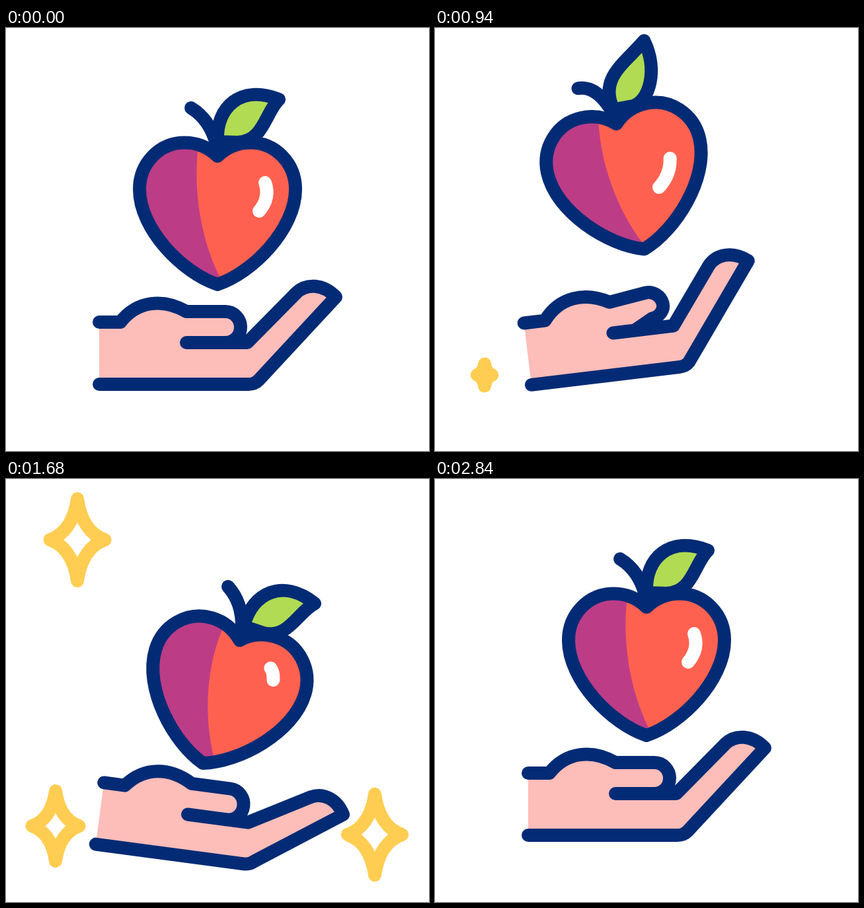
An HTML page with a canvas that plays this animation: 640x640 px, repeating every 3140 ms.

```html
<!DOCTYPE html>
<html lang="en">
<head>
<meta charset="utf-8">
<title>Apple and hand</title>
<style>
  html, body { margin: 0; height: 100%; overflow: hidden; background: #fff; }
  canvas { display: block; }
</style>
</head>
<body>
<canvas width="640" height="640"></canvas>
<script>
const ctx = document.querySelector('canvas').getContext('2d');
const LOOP = 3140;
const NAVY = '#032b75', CORAL = '#ff6150', PURPLE = '#bd3c86', GREEN = '#b1db52',
      PINK = '#fdbdb9', YELLOW = '#ffcd51';

function ease(t, from, to) {
  const x = Math.min(1, Math.max(0, (t - from) / (to - from)));
  return x * x * (3 - 2 * x);
}

// Rises from 0 to 1 at the peak and falls back
const bump = (t, start, peak, end) => ease(t, start, peak) - ease(t, peak, end);

function paint(path, fill, stroke, width = 20) {
  if (fill) { ctx.fillStyle = fill; ctx.fill(path); }
  if (stroke) { ctx.strokeStyle = stroke; ctx.lineWidth = width; ctx.stroke(path); }
}

function turned(x, y, degrees, draw) {
  ctx.save();
  ctx.translate(x, y);
  ctx.rotate(degrees * Math.PI / 180);
  draw();
  ctx.restore();
}

// Points relative to a joint, turned and scaled about it
function swing(x, y, degrees, scale, points) {
  const a = degrees * Math.PI / 180, c = scale * Math.cos(a), s = scale * Math.sin(a);
  return points.map(([px, py]) => [x + px * c - py * s, y + px * s + py * c]);
}

function drawHand(t) {
  const bend = 1.05 * (bump(t, 480, 1200, 1740) - bump(t, 1200, 1740, 2840));
  const drop = 14 * (ease(t, 860, 1320) - ease(t, 1680, 2200));
  const up = Math.max(0, bend);
  const thumb = swing(132, -63, -10.5 * up, 1 - 0.07 * up,
    [[59, 0], [72, 0], [82, 11], [82, 23.5], [82, 37 - 4 * up], [72, 47 - 6 * up], [59, 47 - 6 * up]]);
  const finger = swing(229, 0, 3.3 * bend ** 2 - 11.5 * bend, 1 + 0.035 * (bend - bend ** 2),
    [[70, -92], [84, -105], [109, -106], [129, -85]]);
  const hand = new Path2D(`M0-47H32C58-80 97-83 132-63
    L${thumb[0]}C${thumb.slice(1)}L165-16H132H224
    L${finger[0]}C${finger.slice(1)}L241 41Q235 47 226 47H0`);
  turned(141 - bend, 492 + drop, -8.6 * bend - 0.9 * bend ** 2,
    () => paint(hand, PINK, NAVY));
}

const heart = new Path2D(`M0 0C-14-14-31-20.5-50-20.5C-88-20.5-118 11-118 50
  C-118 111-52 177 0 194C52 177 118 111 118 50C118 11 88-20.5 50-20.5C31-20.5 14-14 0 0Z`);

function drawApple(t) {
  const lift = bump(t, 320, 1050, 1680);
  const press = bump(t, 1050, 1680, 2150);
  const rebound = bump(t, 1680, 2150, 2840);
  const height = 57 * lift - 42 * bump(t, 1050, 1680, 2060) + 14 * bump(t, 1680, 2060, 2320);
  const flex = 1.05 * lift + 1.2 * rebound;
  const light = 1.05 * bump(t, 320, 1100, 1680) - bump(t, 1100, 1680, 2150);
  const shade = 11 * press - 5 * lift - 12 * rebound;

  const leaf = new Path2D(`M0-2C${-2 - 8 * flex}-52 ${35 - 3 * flex} ${23 * flex - 87}
    ${93 - 25 * flex} ${-64 - 28 * flex}C${72 + 8 * flex}-44 ${70 - 14 * flex} 0 30 1L0 0Z`);
  const stem = new Path2D(`M${-40 - 5 * flex} ${8 * flex - 73}
    Q${-12 - 5 * flex} ${-56 - 8 * flex} -2-19`);
  const shadow = new Path2D(`M${4 * flex - 29}-21L${4 * flex - 30}-7
    C-36 56 ${shade / 2 - 25} 126 ${shade + 4} 184V200H-130V-21Z`);
  const along = (base, slide, curve) => base + slide * light + curve * light ** 2;
  const shine = new Path2D(`M${along(72, 5, -10)} ${along(40, 22, 9)}
    Q${along(80, -1, -18)} ${along(63, 32, 0)} ${along(63, -13, -10)} ${along(83, 33, -7)}`);

  turned(320 - 3.5 * lift - 22 * press + 8 * rebound, 388 - height,
    16.6 * press - 13.4 * lift - 4.6 * rebound, () => {
      ctx.translate(0, -194);
      turned(0, -22, -12 * rebound, () => paint(leaf, GREEN, NAVY));
      paint(stem, null, NAVY);
      paint(heart, CORAL);
      ctx.save();
      ctx.clip(heart);
      paint(shadow, PURPLE);
      ctx.restore();
      paint(heart, null, NAVY);
      paint(shine, null, '#fff');
    });
}

function drawSparkle(age, x, y) {
  const rise = 600, fall = 425;
  const size = 1.02 * (age < rise ? 1 - (1 - age / rise) ** 2 : 1 - ((age - rise) / fall) ** 3);
  if (age <= 0 || size <= 0) return;
  const star = new Path2D();
  for (const [sx, sy] of [[1, 1], [1, -1], [-1, -1], [-1, 1]]) {
    const side = [[0, -61], [5, -26], [21, -7], [41, 0]]
      .map(([px, py]) => [x + px * sx * size, y + py * sy * size]);
    if (sx !== sy) side.reverse();
    star.lineTo(...side[0]);
    star.bezierCurveTo(...side[1], ...side[2], ...side[3]);
  }
  star.closePath();
  paint(star, '#fff', YELLOW, Math.min(20, size * 100));
}

function frame(now) {
  const t = now % LOOP;
  ctx.fillStyle = '#fff';
  ctx.fillRect(0, 0, 640, 640);
  ctx.lineCap = ctx.lineJoin = 'round';
  [[75, 525], [108, 92], [558, 538]].forEach(([x, y], i) => drawSparkle(t - 855 - 152 * i, x, y));
  drawHand(t);
  drawApple(t);
  requestAnimationFrame(frame);
}
requestAnimationFrame(frame);
</script>
</body>
</html>
```
